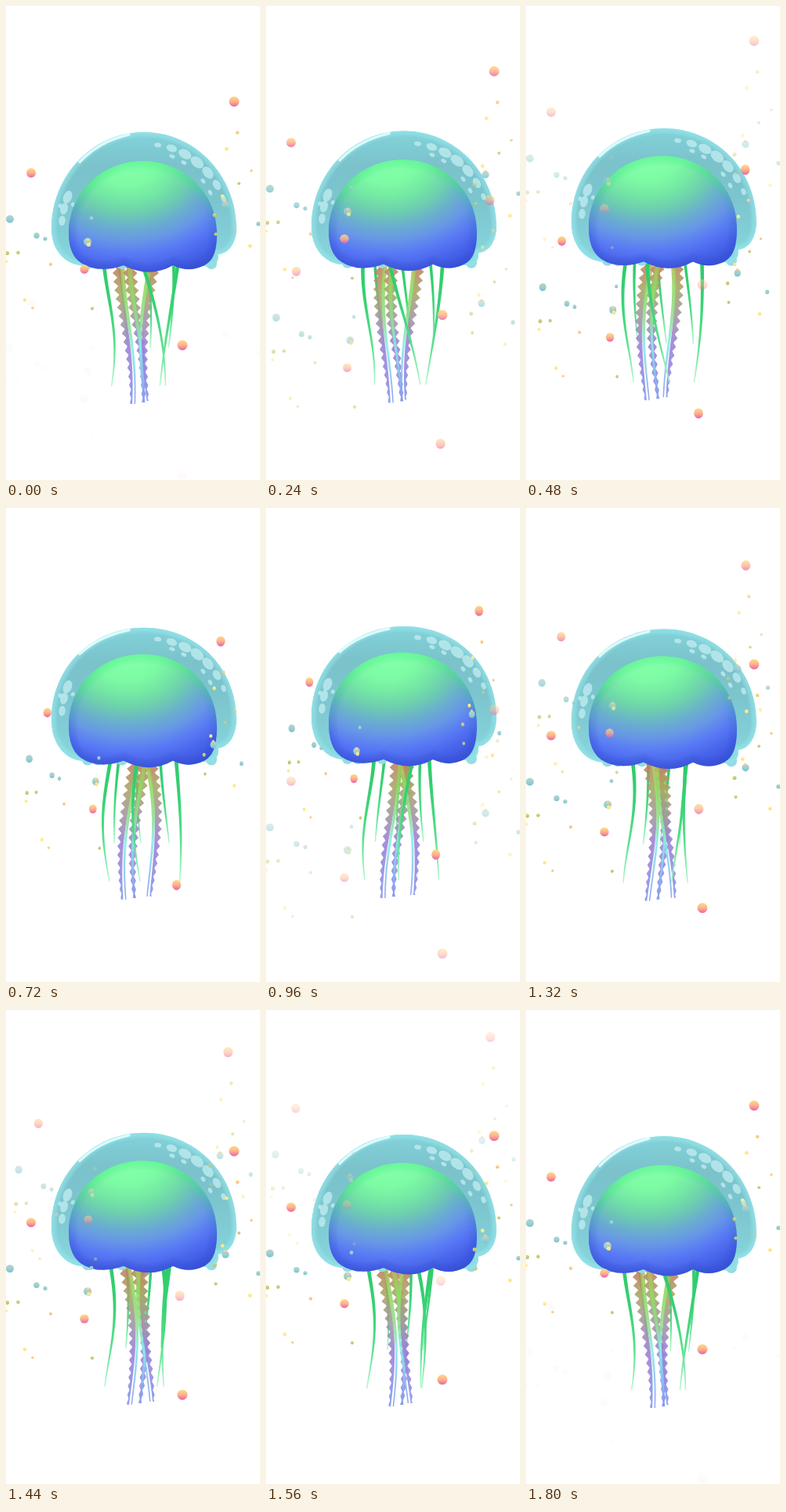
These frames come from a looping animation (324 px wide and 605 px high, 1830 ms). An HTML page with a canvas:

```html
<!DOCTYPE html>
<html lang="en">
<head>
<meta charset="utf-8">
<title>Jellyfish</title>
<style>
html, body { margin: 0; width: 100%; height: 100%; overflow: hidden; background: #fff; }
canvas { display: block; width: 324px; height: 605px; }
</style>
</head>
<body>
<canvas id="stage"></canvas>
<script>
const W = 324, H = 605, LOOP = 1830, CYCLE = 1800, STEP = 30, TAU = Math.PI * 2;
const canvas = document.getElementById('stage');
const ctx = canvas.getContext('2d');
const dpr = window.devicePixelRatio || 1;
canvas.width = W * dpr;
canvas.height = H * dpr;

// Half ellipses on top, lobes and scallops below
const SHELL = 'M58,285 C58,216 111,161 176,161 C241,161 294,216 294,285 ' +
  'C293,303 285,315 271,317 Q272,334 252,332 L105,331 C75,334 58,310 58,285 Z';
const CORE = 'M80,290 C80,239 122,198 174,198 C227,198 269,239 269,290 ' +
  'C269,314 264,325 253,331 Q233,341 213,331 Q183,348 150,331 Q118,342 96,328 C84,320 80,306 80,290 Z';

const clamp = (v, a, b) => Math.min(b, Math.max(a, v));
const ease = u => (1 - Math.cos(Math.PI * u)) / 2;
const squeeze = t => t < 990 ? ease(t / 990) : 1 - ease((t - 990) / 810);

// The squeeze raises everything by 10, and the flanks a little more
const lift = (y, k, bulge) =>
  y - k * (10 + bulge * Math.sin(Math.PI * clamp((y - 165) / 168, 0, 1)));
const outline = (d, k, bulge) =>
  new Path2D(d.replace(/(\d+),(\d+)/g, (_, x, y) => x + ',' + lift(+y, k, bulge)));

function gradient(g, colors) {
  colors.forEach((c, i) => g.addColorStop(i / (colors.length - 1), c));
  return g;
}
const vertical = (y0, y1, colors) => gradient(ctx.createLinearGradient(0, y0, 0, y1), colors);

function ellipse(x, y, rx, ry = rx, tilt = 0) {
  ctx.beginPath();
  ctx.ellipse(x, y, rx, ry, tilt, 0, TAU);
  ctx.fill();
}

// Soft band just inside an outline
function innerGlow(path, style, size, alpha) {
  ctx.save();
  ctx.clip(path);
  ctx.strokeStyle = style;
  ctx.globalAlpha = alpha;
  for (let w = 2; w <= size; w += 3) {
    ctx.lineWidth = w;
    ctx.stroke(path);
  }
  ctx.restore();
}

// Tapered strand carrying a wave downwards; peak is when its top is furthest right,
// lag the delay in ms per px
function strand(t, k, { mid, amp, peak, lag, end, width, tones, drift = 0, fade = 0, left = 0, right = 0 }) {
  const top = 322, shift = -10 * k, sideA = [], sideB = [];
  for (let y = top; y <= end; y++) {
    const u = (y - top) / (end - top), d = y - 330;
    const wave = Math.cos(TAU * (t - peak - lag * d) / CYCLE);
    const x = mid + drift * u + amp * (1 - fade * u) * wave;
    const half = (width * (1 - u) + 1.4 * u) / 2;
    const tooth = Math.abs(y / 11 % 1 * 2 - 1) * (1 - .75 * u * u);
    sideA.push([x - half - tooth * left, y + shift]);
    sideB.unshift([x + half + tooth * right, y + shift]);
  }
  ctx.beginPath();
  sideA.concat(sideB).forEach(p => ctx.lineTo(...p));
  ctx.closePath();
  ctx.fillStyle = vertical(330 + shift, end + shift, tones);
  ctx.fill();
}

function tentacles(t, k) {
  const tones = ['#2dca69', '#38d274', '#58e08d', '#b4f8d0'];
  const long = { end: 485, width: 5, tones };
  const short = { amp: 9, lag: 4, end: 436, width: 4, tones };
  const frill = ['#c27a5c', '#a8a465', '#a294a0', '#9a7ed6', '#9288e0', '#7f94f0'];
  const vein = ['#b9b45c', '#8edb64', '#92dd8a', '#85eee6', '#8bc7f2', '#8296ee'];

  for (let i = 0; i < 3; i++) strand(t, k, { ...short, mid: 147 + 29 * i, peak: 1270 + 240 * i });
  ctx.globalAlpha = .88;
  [900, 920, 300].forEach((peak, i) => {
    const ribbon = { mid: 156 + 13 * i, drift: 2 * i - 2, amp: 11.5, fade: .45, peak, lag: 5, end: 508 - 2 * i };
    strand(t, k, { ...ribbon, width: 7, tones: frill, left: i < 2 ? 6 : 0, right: i ? 6 : 0 });
    strand(t, k, { ...ribbon, mid: ribbon.mid + 4 - 4 * i, width: 6, tones: vein });
  });
  ctx.globalAlpha = 1;
  strand(t, k, { ...long, mid: 178, drift: 8, amp: 25, fade: .3, peak: 1300, lag: 3.1 });
  strand(t, k, { ...long, mid: 131, amp: 7.5, peak: 1080, lag: 6.6 });
  strand(t, k, { ...long, mid: 215, drift: -6, amp: 11, fade: -.2, peak: 330, lag: 3.1 });
}

// Pale spots sit on rings inside the dome; angle is measured from its top
function spots(k) {
  const spot = (angle, ring, size, width = size * .65) => ellipse(
    176 + 118 * ring * Math.sin(angle), lift(285 - 124 * ring * Math.cos(angle), k, 9), size, width, angle);
  ctx.fillStyle = 'rgba(190,235,239,.8)';
  for (let i = 0; i < 7; i++) {
    const angle = .17 + .175 * i;
    spot(angle, .88 + .006 * i, 4.5 + 5 * Math.sin(Math.PI * i / 6));
    if (i % 3) spot(angle + .04, .81, 3.7);
  }
  for (let i = 0; i < 3; i++) spot(-1.19 - .14 * i, .89, 8.5 - i, 5.5 - i * .6);
  spot(-1.25, .81, 2.8, 2.4);
  spot(-1.31, .94, 2.8, 2.4);
}

function bell(k) {
  const top = 161 - 10 * k, bottom = top + 175;
  ctx.fillStyle = '#96dce3';
  for (const x of [104, 117, 148, 262]) ellipse(x, 329 - 9 * k, 7);

  const shell = outline(SHELL, k, 9);
  ctx.fillStyle = vertical(top, bottom, ['#83d3da', '#7bc2cb', '#7cc5ce', '#82ced6', '#8ad9df']);
  ctx.fill(shell);
  innerGlow(shell, '#94e6ec', 14, .2);
  spots(k);

  ctx.strokeStyle = '#dcfbfb';
  ctx.lineWidth = 3.4;
  ctx.lineCap = 'round';
  ctx.stroke(outline('M94,199 Q118,173 157,164', k, 9));

  const core = outline(CORE, k, 6);
  ctx.save();
  ctx.clip(core);
  ctx.translate(155, 193 - 10 * k);
  ctx.scale(1.2, 1);
  ctx.fillStyle = gradient(ctx.createRadialGradient(0, 0, 0, 0, 0, 160),
    ['#84ffa9', '#82fea8', '#7dfaa4', '#74e8a4', '#6dcfae', '#6ab0cc', '#6797e6', '#5879f5', '#4763ea', '#3852da']);
  ctx.fillRect(-160, -40, 320, 220);
  ctx.restore();
  innerGlow(core, vertical(top + 37, bottom, ['#48f088', '#3ae080', '#4394bc', '#3552d4', '#3048cc']), 24, .07);
}

// Fixed seed, so the specks are the same in every loop
let seed = 11;
const random = () => (seed = seed * 16807 % 2147483647) / 2147483647;
const ORANGE = ['#ffd987', '#fdb28c', '#ea64a8'];
const TEAL = ['#bcd0c6', '#9cd0d2', '#78c3d2'];
const SPECKS = [['#fff19a', '#ffdf78'], ['#dcd888', '#b9bd68'], ['#ffdf96', '#efbb80']];
const bubble = tones => ([x, y, r]) => ({ x, y, r, tones });
const BUBBLES = [
  ...[[291,122,6.5], [32,213,6], [100,336,5.7], [225,433,6.5]].map(bubble(ORANGE)),
  ...[[5,272,5], [39,293,3.7], [50,297,2.6], [104,301,5], [109,271,2.4], [280,254,4.7], [322,278,2.8]].map(bubble(TEAL))
];
for (let i = 0; i < 18; i++) {
  // Specks gather in the outer columns
  const x = i % 2 ? 265 + 58 * random() : 110 * random();
  BUBBLES.push({ x, y: (i % 2 ? 145 : 250) + 170 * random(), r: 1.7 + random(), tones: SPECKS[i % 3] });
}

function bubbles(t, start, pinch) {
  const age = (t - start + 200 + CYCLE) % CYCLE - 200;
  ctx.save();
  ctx.globalAlpha = clamp((age + 200) / 450, 0, 1) * clamp((1550 - age) / 550, 0, 1);
  ctx.translate(174, (840 - age) * .1615);
  ctx.scale(1 - pinch, 1);
  for (const { x, y, r, tones } of BUBBLES) {
    ctx.fillStyle = vertical(y - r, y + r, tones);
    ellipse(x - 174, y, r);
  }
  ctx.restore();
}

function draw(t) {
  ctx.setTransform(dpr, 0, 0, dpr, 0, 0);
  ctx.fillStyle = '#fff';
  ctx.fillRect(0, 0, W, H);
  const k = squeeze(t);
  tentacles(t, k);
  bell(k);
  bubbles(t, 960, 0);
  bubbles(t, 178, Math.max(0, .18 * (1 - Math.abs(t - 885) / 875)));
}

const start = performance.now();
function tick() {
  const t = (performance.now() - start) % LOOP;
  draw(Math.floor(t / STEP) * STEP % CYCLE);
  requestAnimationFrame(tick);
}
tick();
</script>
</body>
</html>
```
